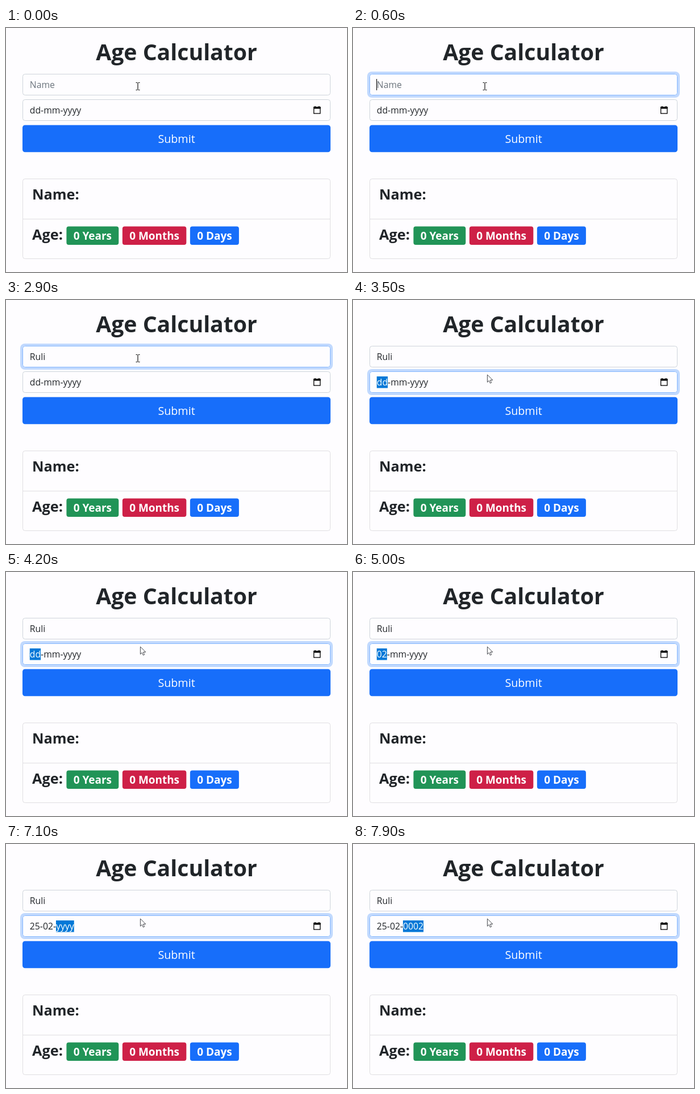
Write an HTML page with a canvas that moves like this. It is 600 px wide and 431 px high and loops after 8 s.

```html
<!DOCTYPE html>
<html lang="en">
<head>
<meta charset="utf-8">
<title>Age Calculator</title>
<style>
  html, body { margin: 0; width: 100%; height: 100%; overflow: hidden; background: #fefdff; }
  canvas { display: block; width: 600px; height: 431px; }
</style>
</head>
<body>
<canvas id="stage"></canvas>
<script>
const W = 600, H = 431, LOOP = 8000, STEP = 100;
const FAMILY = '"Open Sans", "Noto Sans", sans-serif';
const INK = '#212529', BLUE = '#176efa', GREEN = '#219457', RED = '#ce2047';
const FIELD_SIZE = 15.75, HEAD_SIZE = 25.27, BADGE_SIZE = HEAD_SIZE * 0.75;
const NAME = 'Ruli';
const FOCUS_NAME = 500, FOCUS_DATE = 3300;
const KEYS = [1400, 1900, 2100, 2300];
const MOVE = { start: 2900, end: 3200, from: [232, 103], to: [236, 132] };

// Date field states: start time, day, month, year, selected part
const DATES = [
  [0, 'dd', 'mm', 'yyyy', -1],
  [FOCUS_DATE, 'dd', 'mm', 'yyyy', 0],
  [4700, '02', 'mm', 'yyyy', 0],
  [5300, '25', 'mm', 'yyyy', 1],
  [6100, '25', '00', 'yyyy', 1],
  [6800, '25', '02', 'yyyy', 2],
  [7600, '25', '02', '0002', 2]
];

const canvas = document.getElementById('stage');
const ctx = canvas.getContext('2d');
const ratio = window.devicePixelRatio || 1;
canvas.width = Math.round(W * ratio);
canvas.height = Math.round(H * ratio);

function setFont(size, weight = 400) {
  ctx.font = `${weight} ${size}px ${FAMILY}`;
}

function text(str, x, y, color = INK, align = 'left') {
  ctx.fillStyle = color;
  ctx.textAlign = align;
  ctx.fillText(str, x, y);
  return ctx.measureText(str).width;
}

function roundRect(x, y, w, h, r) {
  ctx.beginPath();
  ctx.roundRect(x, y, w, h, r);
}

function fillBox(x, y, w, h, r, color) {
  roundRect(x, y, w, h, r);
  ctx.fillStyle = color;
  ctx.fill();
}

function strokeBox(x, y, w, h, r, color) {
  roundRect(x, y, w, h, r);
  ctx.strokeStyle = color;
  ctx.lineWidth = 1;
  ctx.stroke();
}

function field(y, focused) {
  if (focused) fillBox(25, y - 4.5, 550, 46, 8, '#c1d9fe');
  fillBox(29, y - 0.5, 542, 38, 4.5, '#fefdff');
  strokeBox(29.5, y, 541, 37, 4, focused ? '#86b7fe' : '#ced4da');
}

function nameField(t) {
  const focused = t >= FOCUS_NAME && t < FOCUS_DATE;
  field(81.5, focused);
  setFont(FIELD_SIZE);
  const typed = NAME.slice(0, KEYS.filter(k => t >= k).length);
  let x = 41.8;
  if (typed) x += text(typed, x, 106);
  else text('Name', x, 106, '#6c757d');
  const last = Math.max(FOCUS_NAME, ...KEYS.filter(k => t >= k));
  if (focused && (t - last) % 1000 < 500) {
    ctx.fillStyle = '#111';
    ctx.fillRect(Math.round(x) - 1, 90, 1.2, 20);
  }
}

function dateField(t) {
  const [, day, month, year, selected] = DATES.filter(d => t >= d[0]).pop();
  field(126.5, selected >= 0);
  setFont(FIELD_SIZE);
  let x = 41.8;
  [day, month, year].forEach((part, i) => {
    if (i) x += text('-', x, 151);
    const on = i === selected;
    if (on) {
      ctx.fillStyle = '#0078d7';
      ctx.fillRect(x, 135, ctx.measureText(part).width, 20.5);
    }
    x += text(part, x, 151, on ? '#fff' : INK);
  });
  calendarIcon(541, 138);
}

function calendarIcon(x, y) {
  ctx.fillStyle = '#000';
  ctx.fillRect(x + 2, y, 1.6, 2);
  ctx.fillRect(x + 8.9, y, 1.6, 2);
  ctx.fillRect(x, y + 1.2, 12.5, 3.4);
  ctx.strokeStyle = '#000';
  ctx.lineWidth = 1.3;
  ctx.strokeRect(x + 0.65, y + 2, 11.2, 11);
}

function card() {
  strokeBox(29.5, 266.5, 541, 141, 4, '#dfdee1');
  ctx.fillStyle = '#dfdee1';
  ctx.fillRect(30, 337, 540, 1);
  setFont(HEAD_SIZE, 700);
  text('Name:', 46, 302.7);
  const gap = ctx.measureText(' ').width;
  let x = 46 + text('Age:', 46, 374) + gap;
  setFont(BADGE_SIZE, 700);
  const pad = BADGE_SIZE * 0.65;
  for (const [label, color] of [['0 Years', GREEN], ['0 Months', RED], ['0 Days', BLUE]]) {
    const w = ctx.measureText(label).width + pad * 2;
    fillBox(x, 350.4, w, 32.5, 4, color);
    text(label, x + pad, 374, '#fff');
    x += w + gap;
  }
}

function beam(x, y) {
  ctx.strokeStyle = '#111';
  ctx.lineWidth = 1.2;
  ctx.beginPath();
  for (const s of [-1, 1]) {
    ctx.moveTo(x - 3.5, y + s * 6.5);
    ctx.lineTo(x - 0.8, y + s * 6.5);
    ctx.moveTo(x + 0.8, y + s * 6.5);
    ctx.lineTo(x + 3.5, y + s * 6.5);
  }
  ctx.moveTo(x, y - 6.2);
  ctx.lineTo(x, y + 6.2);
  ctx.stroke();
}

function arrow(x, y) {
  const points = [[0, 0], [0, 13.2], [3, 10.4], [5, 15], [7.2, 14], [5.2, 9.5], [9.4, 9.4]];
  ctx.beginPath();
  for (const [dx, dy] of points) ctx.lineTo(x + 0.4 + dx, y + dy);
  ctx.closePath();
  ctx.fillStyle = '#fff';
  ctx.fill();
  ctx.strokeStyle = '#44464b';
  ctx.lineWidth = 1;
  ctx.stroke();
}

function pointer(t) {
  const p = Math.min(1, Math.max(0, (t - MOVE.start) / (MOVE.end - MOVE.start)));
  const ease = p * p * (3 - 2 * p);
  const [x, y] = MOVE.from.map((a, i) => a + (MOVE.to[i] - a) * ease);
  if (y < 119) beam(x, y);
  else arrow(x, y);
}

function draw(t) {
  ctx.setTransform(ratio, 0, 0, ratio, 0, 0);
  ctx.textBaseline = 'alphabetic';
  ctx.fillStyle = '#fefdff';
  ctx.fillRect(0, 0, W, H);
  setFont(39.2, 700);
  text('Age Calculator', 300, 56.7, INK, 'center');
  nameField(t);
  dateField(t);
  fillBox(29, 171.5, 542, 47.7, 4.5, BLUE);
  setFont(19.7);
  text('Submit', 300, 203, '#fff', 'center');
  card();
  pointer(t);
}

const begin = performance.now();
function tick() {
  const t = (performance.now() - begin) % LOOP;
  draw(Math.floor(t / STEP) * STEP);
  requestAnimationFrame(tick);
}
tick();
</script>
</body>
</html>
```
